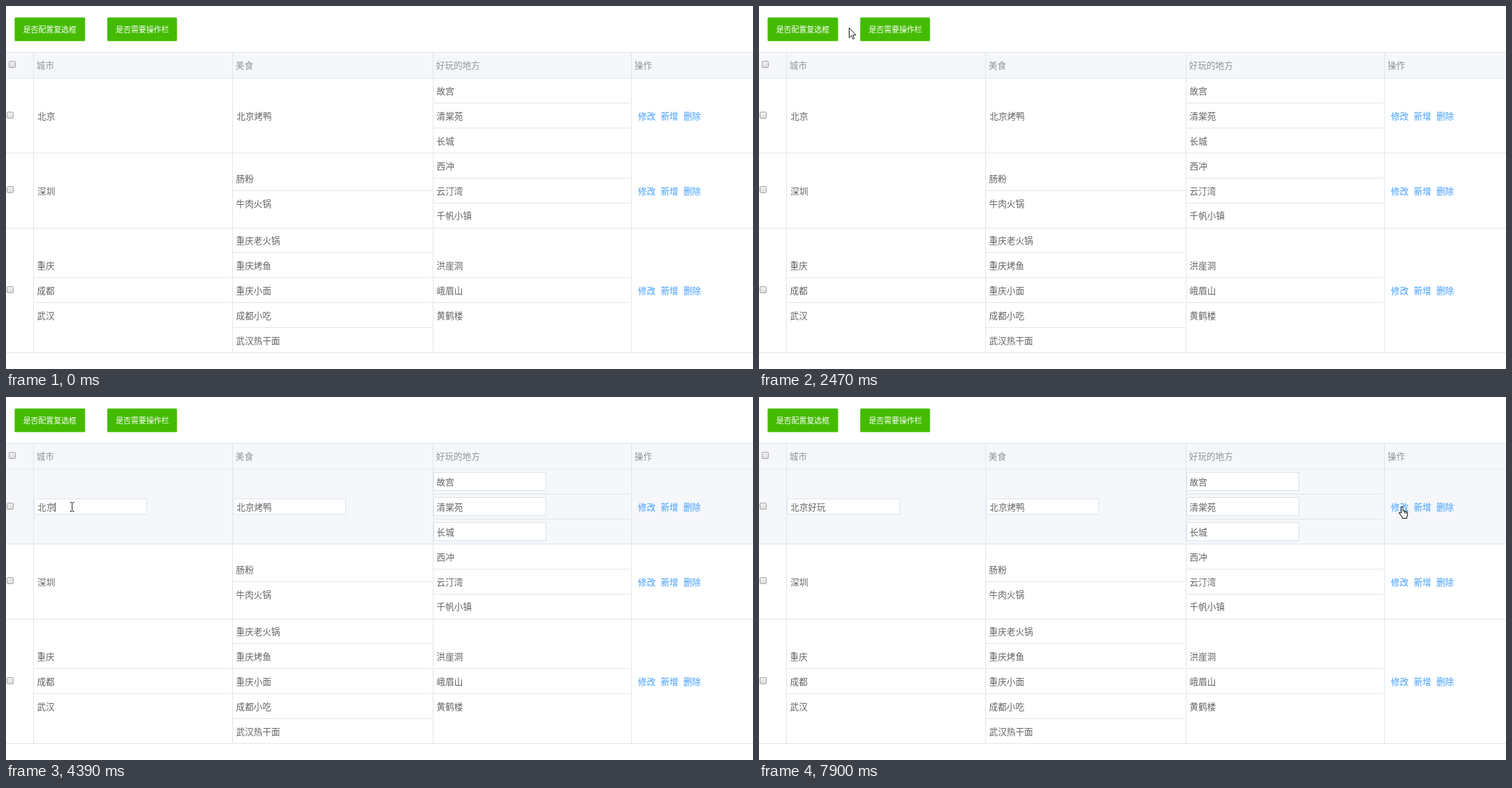
These frames come from a looping animation (1073 px wide and 522 px high, 8000 ms). An HTML page:

```html
<!DOCTYPE html>
<html lang="zh-CN">
<head>
<meta charset="utf-8">
<title>Editable table</title>
<style>
  html, body { margin: 0; width: 100%; height: 100%; overflow: hidden; background: #fff; }
  svg { display: block; width: 100vw; height: 100vh; }
  text { font-family: "Noto Sans CJK SC", "Noto Sans CJK JP", "Noto Sans CJK", sans-serif; white-space: pre; }
  .label { font-weight: 500; }
  .latin { font-family: "Open Sans", "Noto Sans", sans-serif; }
  .pinyin { font-family: "Liberation Sans", Arial, sans-serif; font-weight: bold; }
  .mono { font-family: "Noto Sans Mono", monospace; }
</style>
</head>
<body>
<svg id="stage" viewBox="0 0 1073 522" xmlns="http://www.w3.org/2000/svg"></svg>
<script>
const LOOP = 8000;
const TOP = 104, PITCH = 35.85, SIZE = 12.6;
const LINE = '#dfe6ec', TINT = '#f5f7fa', INK = '#606266', BLUE = '#409eff';

const stage = document.getElementById('stage');

// Left edges of the city, food, place and action columns
const VIEWS = {
  full: [39.5, 325.5, 613.5, 898.5],
  noCheck: [-2.5, 295.5, 594.5, 891],
  noOps: [47.5, 391.5, 735.5, 1075]
};
const HEADS = ['城市', '美食', '好玩的地方', '操作'];
const ROWS = [
  { start: 0, span: 3, cells: [['北京'], ['北京烤鸭'], ['故宫', '清棠苑', '长城']] },
  { start: 3, span: 3, cells: [['深圳'], ['肠粉', '牛肉火锅'], ['西冲', '云汀湾', '千帆小镇']] },
  { start: 6, span: 5, cells: [['重庆', '成都', '武汉'],
    ['重庆老火锅', '重庆烤鱼', '重庆小面', '成都小吃', '武汉热干面'],
    ['洪崖洞', '峨眉山', '黄鹤楼']] }
];
const BUTTONS = [
  { x: 12, w: 102, label: '是否配置复选框', presses: [[1070, 1220], [1850, 2000]] },
  { x: 145, w: 101, label: '是否需要操作栏', presses: [[2780, 2840], [3540, 3640]] }
];

// Pointer moves: first step, last step, step count, [progress, x, y] points
const MOVES = [
  { from: 70, to: 760, n: 9, path: [[0, 1110, 550], [.78, 120, 120], [.9, 41, 62], [1, 57, 31]] },
  { from: 2230, to: 2630, n: 6, path: [[0, 57, 31], [1, 165, 31]] },
  { from: 3850, to: 4390, n: 8, path: [[0, 165, 31], [.375, 960, 150], [.5, 922, 157], [.625, 920, 157], [1, 95, 158]] },
  { from: 4540, to: 4640, n: 2, path: [[0, 95, 158], [1, 92, 158]] },
  { from: 7040, to: 7820, n: 11, path: [[0, 92, 158], [.45, 560, 178], [.74, 1015, 146], [1, 924, 157]] }
];

// Typed letters: time and right end of the composed text
const KEYS = [[5170, 78], [5320, 84.5], [5550, 91], [5790, 101], [6020, 108], [6100, 115]];
const COMMIT = 6480, EDIT = 4158;

const within = (t, a, b) => t >= a && t < b;
const snap = v => Math.floor(v) + .5;

const text = (x, cy, s, fill = INK, size = SIZE, cls = '') =>
  `<text class="${cls}" x="${x}" y="${(cy + size * .38).toFixed(2)}" font-size="${size}" fill="${fill}">${s}</text>`;
const rect = (x, y, w, h, fill, more = '') =>
  `<rect x="${x}" y="${y}" width="${w}" height="${h}" fill="${fill}" ${more}/>`;
const path = (d, more) => `<path d="${d}" ${more}/>`;
const hLine = (x1, x2, y, color = LINE) => path(`M${x1} ${y}H${x2}`, `stroke="${color}"`);
const vLine = (x, y1, y2, color = LINE) => path(`M${x} ${y1}V${y2}`, `stroke="${color}"`);

function pointer(t) {
  const move = MOVES.filter(m => t >= m.from).pop();
  if (!move) return null;
  const gap = (move.to - move.from) / (move.n - 1);
  const step = Math.min(move.n, Math.floor((t - move.from) / gap + 1e-6) + 1);
  const u = step / move.n;
  const i = Math.max(1, move.path.findIndex(p => p[0] >= u));
  const [u0, x0, y0] = move.path[i - 1], [u1, x1, y1] = move.path[i];
  const k = (u - u0) / (u1 - u0);
  return { x: x0 + (x1 - x0) * k, y: y0 + (y1 - y0) * k };
}

function button({ x, w, label, presses }, t) {
  const down = presses.some(([a, b]) => within(t, a, b));
  return rect(x + .4, 16.4, w - .8, 34.2, down ? '#2e8501' : '#44bb00', 'rx="1.6"') +
    text(x + 12.7, 33.5, label, down ? '#a8c99a' : '#fff', 10.95, 'label');
}

function checkbox(x, y) {
  return rect(x + .5, y + .5, 9, 9, 'url(#box)', 'rx="1.5" stroke="#a6a6a6"');
}

function cell(items, row, left, right, editing) {
  const many = items.length > 1;
  const first = TOP + PITCH * (row.start + (row.span - items.length) / 2);
  const shift = many ? 0 : .7;
  return items.map((s, i) => {
    const mid = first + PITCH * (i + .5);
    const h = many ? 26 : 22;
    return (i ? hLine(left + .5, right - 2, snap(first + PITCH * i)) : '') +
      (editing ? rect(left + 1 + shift / 2, snap(mid - (many ? 13 : 11)), 161, h, '#fff', 'stroke="#dbe3ea"') : '') +
      text(left + 5.1 + shift, mid + .5, s);
  }).join('');
}

function table(t, hover) {
  const cols = within(t, 1220, 2000) ? VIEWS.noCheck : within(t, 2840, 3640) ? VIEWS.noOps : VIEWS.full;
  const hasCheck = cols[0] > 0, hasOps = cols[3] < 1073;
  let out = rect(0, 66, 1073, 38, TINT);
  HEADS.forEach((s, i) => out += text(cols[i] + 4.3, 85.3, s, '#909399'));
  if (hasCheck) out += checkbox(4, 79);

  ROWS.forEach((row, r) => {
    const y = TOP + PITCH * row.start, h = PITCH * row.span, mid = y + h / 2;
    if (hover === r) out += rect(0, y, 1073, h, TINT);
    if (hasCheck) out += checkbox(1, Math.round(mid - 6));
    row.cells.forEach((items, c) => {
      const shown = r === 0 && c === 0 && t >= COMMIT ? ['北京好玩'] : items;
      out += cell(shown, row, cols[c], cols[c + 1], r === 0 && t >= EDIT);
    });
    if (hasOps) ['修改', '新增', '删除'].forEach((s, i) => out += text(cols[3] + 9.3 + i * 32.6, mid + .6, s, BLUE));
    out += hLine(0, 1073, snap(y + h));
  });

  out += hLine(0, 1073, 66.5) + hLine(0, 1073, TOP);
  cols.forEach(x => { if (x > 0) out += vLine(x, 66, 498); });
  return out;
}

const caret = x => vLine(x, 152, 165, '#333');

function composing(t) {
  const count = KEYS.filter(k => t >= k[0]).length;
  if (!count || t >= COMMIT) {
    const on = within(t, 4390, 4940) ? 70.5 : within(t, COMMIT, 7040) || within(t, 7430, 7900) ? 95.5 : 0;
    return on ? caret(on) : '';
  }
  const end = KEYS[count - 1][1];
  const typed = 'haowan'.slice(0, count);
  return text(70.5, 157.8, typed, INK, 11.7, 'latin') + hLine(71, end, 164.5, '#666') + inputPanel(end, typed);
}

function inputPanel(x, typed) {
  const long = typed.length > 3;
  const words = long ? ['好玩', '好晚', '好完', '号玩', '豪玩'] : ['好', '号', '耗', '浩', '豪'];
  const step = long ? 47.6 : 35, width = long ? 293 : 232;
  const nav = Math.round(9.5 + step * 5);
  let out = rect(.5, .5, width - 1, 43, '#fdfeff', 'stroke="#a9bcc8"') +
    hLine(1, width - 1, 21.5, '#dbe6ed') +
    text(8, 11.2, typed, '#0a5fc0', 13.2, 'pinyin typed') +
    path('M0 4.5V19', 'id="bar" stroke="#f22"');
  words.forEach((s, i) => {
    const color = i ? '#1c87d6' : '#f01818', left = 8 + i * step;
    out += text(left, 32.8, `${i + 1}.`, color, 10.5, 'mono') + text(left + 12.4, 32.6, s, color);
  });
  out += rect(nav - .5, 27.5, 22, 10, '#fff', 'rx="1" stroke="#c9dcea"') + vLine(nav + 10.5, 28, 37, '#c9dcea') +
    path(`M${nav + 6.5} 30v5l-3-2.5z`, 'fill="#b5cfe2"') + path(`M${nav + 14.5} 30v5l3-2.5z`, 'fill="#1c87d6"') +
    `<circle cx="${width - 13}" cy="12.5" r="11.5" fill="#f5a78c"/>`;
  return `<g transform="translate(${x} 165)">${out}</g>`;
}

function cursorKind({ x, y }, t) {
  const onButton = within(y, 16, 51) && BUTTONS.some(b => within(x, b.x, b.x + b.w));
  const onLink = within(y, 150, 167) && within(x, 906, 1000);
  if (onButton || onLink) return 'hand';
  return t >= EDIT && within(y, 146, 170) && (within(x, 40, 202) || within(x, 327, 489)) ? 'beam' : 'arrow';
}

const CURSORS = {
  hand: path('M-1 9.5V2q0-1.4 1.2-1.4t1.3 1.4v4.5q1.6-.6 2.2.4 1.5-.5 2.1.6 1.9-.3 1.9 1.4v3.3l-1 2.5v1.8h-6v-1.4l-4-5.2q-.8-1.3.2-1.7 1-.2 2.1 1.3z' +
    'M3.7 7v3M5.8 7.6v2.6', 'transform="translate(-.6 0) scale(1.06)" fill="#fff" stroke="#111" stroke-width=".95" stroke-linejoin="round"'),
  arrow: path('M.5.5v14l3.2-3 2.2 5 2-.9-2.2-4.9h4.5z', 'fill="#fff" stroke="#111" stroke-width=".95"'),
  beam: path('M-3-6.5h2l1 1 1-1h2M0-5.5v11M-3 6.5h2l1-1 1 1h2', 'fill="none" stroke="#111"')
};

const DEFS = '<defs><linearGradient id="box" x2="0" y2="1"><stop stop-color="#f3f3f3"/><stop offset="1" stop-color="#dadada"/></linearGradient></defs>';

let last = '';
function render(t) {
  const p = pointer(t);
  const hover = p ? ROWS.findIndex(r => within(p.y, TOP + PITCH * r.start, TOP + PITCH * (r.start + r.span))) : -1;
  let out = DEFS + rect(0, 0, 1073, 522, '#fff') + BUTTONS.map(b => button(b, t)).join('') + table(t, hover);
  const mark = p ? `<g transform="translate(${p.x.toFixed(1)} ${p.y.toFixed(1)})">${CURSORS[cursorKind(p, t)]}</g>` : '';
  out += within(t, KEYS[0][0], COMMIT) ? mark + composing(t) : composing(t) + mark;
  if (out === last) return;
  last = out;
  stage.innerHTML = out;
  const bar = document.getElementById('bar');
  if (bar) {
    const end = 8.5 + stage.querySelector('.typed').getComputedTextLength();
    bar.setAttribute('transform', `translate(${Math.round(end) + .5} 0)`);
  }
}

const begin = performance.now();
function frame() {
  render((performance.now() - begin) % LOOP);
  requestAnimationFrame(frame);
}
frame();
</script>
</body>
</html>
```
